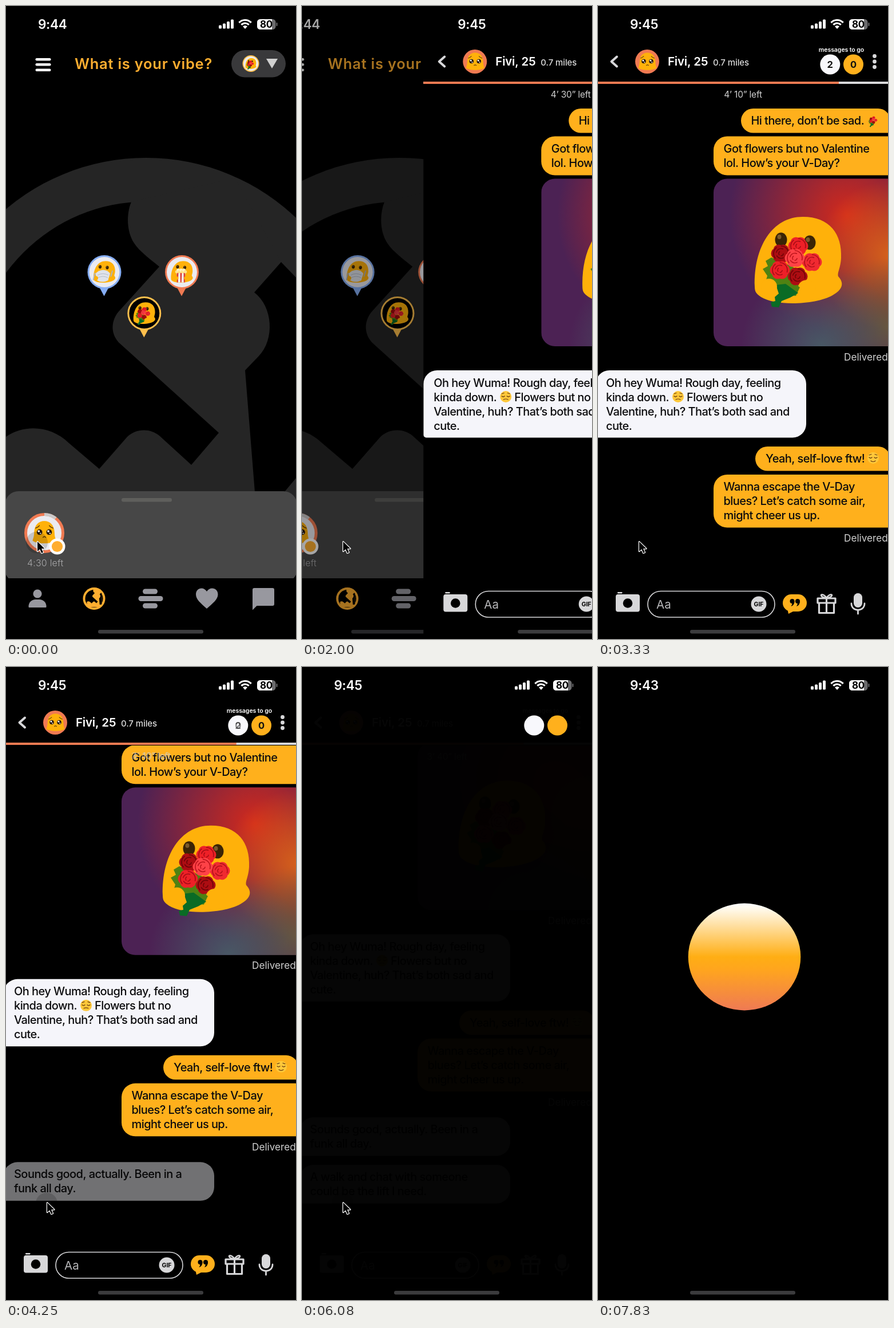
Recreate the animation shown at these times as an HTML page with a canvas. Size 507x1105 px, loop 8000 ms.

```html
<!DOCTYPE html>
<html lang="en">
<head>
<meta charset="utf-8">
<title>Vibe chat</title>
<style>
html, body { margin: 0; width: 100%; height: 100%; overflow: hidden; background: #000; }
canvas { display: block; width: 100vw; height: 100vh; }
</style>
</head>
<body>
<canvas id="stage"></canvas>
<script>
const W = 507, H = 1105, LOOP = 8000, PAGE = 515;
const AMBER = '#ffb01c', CORAL = '#f07a52', LAND = '#252525', ICON = '#98989f', PALE = '#d8d8da';
const BLOB = '#ffb10a';
const canvas = document.getElementById('stage');
const ctx = canvas.getContext('2d');

// ---- helpers ----
const clamp = v => Math.max(0, Math.min(1, v));
const span = (t, a, b) => clamp((t - a) / (b - a));
const smooth = (t, a, b) => { const u = span(t, a, b); return u * u * (3 - 2 * u); };
const easeOut = (t, a, b) => 1 - (1 - span(t, a, b)) ** 3;
const mix = (a, b, k) => a + (b - a) * k;

function group(draw, x = 0, y = 0, s = 1, alpha = 1) {
  if (alpha <= 0) return;
  ctx.save();
  ctx.globalAlpha *= alpha;
  ctx.translate(x, y);
  ctx.scale(s, s);
  draw();
  ctx.restore();
}
function fade(alpha, draw) { group(draw, 0, 0, 1, alpha); }
function text(str, x, y, size, color, weight = 400, spacing = 0, align = 'left') {
  ctx.font = `${weight} ${size}px Inter, sans-serif`;
  ctx.letterSpacing = spacing + 'px';
  ctx.textAlign = align;
  ctx.fillStyle = color;
  ctx.fillText(str, x, y);
}
function box(x, y, w, h, r, color) {
  ctx.beginPath();
  ctx.roundRect(x, y, w, h, r);
  ctx.fillStyle = color;
  ctx.fill();
}
function oval(x, y, rx, ry, color) {
  ctx.beginPath();
  ctx.ellipse(x, y, rx, ry, 0, 0, 7);
  ctx.fillStyle = color;
  ctx.fill();
}
const disc = (x, y, r, color) => oval(x, y, r, r, color);
function fill(d, color) { ctx.fillStyle = color; ctx.fill(new Path2D(d)); }
function stroke(d, color, width) {
  ctx.strokeStyle = color;
  ctx.lineWidth = width;
  ctx.lineCap = ctx.lineJoin = 'round';
  ctx.stroke(new Path2D(d));
}
function ring(x, y, r, color, width, a = 0, b = Math.PI * 2) {
  ctx.beginPath();
  ctx.arc(x, y, r, a, b);
  ctx.strokeStyle = color;
  ctx.lineWidth = width;
  ctx.lineCap = 'butt';
  ctx.stroke();
}

// ---- characters ----
const BODY = 'M-76 45C-78-25-45-77 8-77C55-77 77-47 75-5C74 13 68 20 70 27C82 40 76 51 60 60C30 77-40 79-65 63C-74 57-76 53-76 45Z';
const BELL = 'M-76 54C-74 40-66 30-66 0C-64-50-35-74 0-74C35-74 64-50 66 0C66 30 74 40 76 54C50 76-50 76-76 54Z';

function rose(x, y, color, line) {
  for (let i = 0; i < 6; i++) {
    const a = i * Math.PI / 3;
    disc(x + 8 * Math.cos(a), y + 7 * Math.sin(a), 9.5, color);
  }
  for (const [r, a] of [[4, 0], [8.5, 1], [13, 2.4]]) {
    ring(x, y, r, line, 1.7, a, a + 1.7);
    ring(x, y, r, line, 1.7, a + 2.3, a + 4.2);
  }
}
function bouquet() {
  fill('M-47-6L-57 0L-53 9L-62 14L-54 26L-57 36L-38 42L-30 59L-4 61L2 48L14 28L-10 10Z', '#4f8212');
  fill('M-39 42L-34 57L-41 63L-40 70L-48 72L-46 80L-34 81L-29 70L-14 64L0 56L-22 40Z', '#0a6b25');
  rose(-30, -13, '#ad0d12', '#6d0508');
  rose(0, -26, '#ee2027', '#a80d16');
  rose(24, 2, '#f02a31', '#b3121a');
  rose(-32, 16, '#ee2027', '#a80d16');
  rose(-1, 27, '#ad0d12', '#6d0508');
  rose(-6, -5, '#ff4247', '#bd151d');
}
const extras = {
  flowers() {
    bouquet();
    disc(-51, 45, 14, BLOB);
    fill('M0 44C4 30 24 30 30 42C34 56 20 64 10 62C8 54 6 48 0 44Z', BLOB);
  },
  popcorn() {
    fill('M-38 5L26 5L16 72L-28 72Z', '#f4f4f4');
    for (let i = 0; i < 3; i++) fill(`M${-36 + i * 24} 5h12l-3 67h-8Z`, '#dc3d32');
    for (let i = 0; i < 7; i++) disc(-36 + i * 10, -2 - (i % 2) * 12, 11, i % 2 ? '#fff3c4' : '#ffe28a');
    disc(-36, 42, 12, BLOB);
    disc(27, 42, 12, BLOB);
  },
  cloth() {
    fill('M-62 10C-30-22 14-24 40 10L26 58C0 72-36 72-52 56Z', '#dfe3ea');
    stroke('M-46 20Q-10 2 26 20M-42 38Q-10 22 22 38', '#b3bac8', 4);
    stroke('M-66 8L-78 54M56-8L42 40', '#a8b4cc', 7);
    disc(-58, 42, 14, BLOB);
    disc(44, 46, 14, BLOB);
  },
  sad() {
    for (const x of [-31, 31]) {
      disc(x, -2, 18, '#26160a');
      disc(x - 5, -8, 7, '#fff');
      disc(x + 6, 6, 4.5, '#fff');
    }
    stroke('M-56-28Q-42-32-32-44M56-28Q42-32 32-44M-9 32Q0 22 9 32', '#4a2b08', 5);
  }
};
function blob(x, y, s, kind) {
  group(() => {
    fill(kind === 'sad' ? BELL : BODY, BLOB);
    if (kind !== 'sad') {
      for (const [ex, ey] of [[-30, -37], [20, -32]]) {
        oval(ex, ey, 10.5, 12.5, '#3a2405');
        oval(ex - 3, ey - 5, 3.5, 4, '#7a5a2c');
      }
    }
    extras[kind]();
  }, x, y, s);
}
function smiley(x, y, calm) {
  disc(x, y, 10, '#ffc83a');
  stroke(`M${x - 7} ${y - 1}q2.5 2.5 5 0M${x + 2} ${y - 1}q2.5 2.5 5 0`, '#6b3d10', 1.3);
  stroke(`M${x - 4} ${y + 5}q4 ${calm ? 3 : -2} 8 0M${x - 7} ${y - 5}l4 -1.5M${x + 7} ${y - 5}l-4 -1.5`, '#6b3d10', 1.2);
}

// ---- shared chrome ----
function statusBar(clock) {
  text(clock, 56, 40, 22.5, '#fff', 600, -0.3);
  [6, 9, 12.5, 16].forEach((h, i) => box(372 + i * 7, 39.5 - h, 5, h, 1.5, '#fff'));
  for (const r of [14.5, 9]) ring(418, 39, r, '#fff', 3.2, -Math.PI * 0.76, -Math.PI * 0.24);
  fill('M418 40L414 35.5Q418 32.5 422 35.5Z', '#fff');
  box(439, 23, 32.5, 18, 5.5, '#6c6c6e');
  box(439, 23, 26, 18, [5.5, 0, 0, 5.5], '#fff');
  box(472.5, 29, 2, 6, 1, '#6c6c6e');
  text('80', 455, 38.2, 17, '#000', 700, -0.3, 'center');
}
const homeBar = () => box(161, 1089, 184, 6.5, 3.2, '#3b3b3d');

function cursor(x, y) {
  group(() => {
    const arrow = 'M0 0V17L4.2 13.2L7.2 20L10 18.8L7 12.2H12.4Z';
    stroke(arrow, '#fff', 2.4);
    fill(arrow, '#000');
  }, x + 1, y + 1);
}

// ---- map page ----
function pin(x, y, color, back, kind) {
  fill(`M${x - 9} ${y + 26}h17l-8.5 16Z`, color);
  disc(x, y, 29.5, color);
  disc(x, y, 26.5, back);
  blob(x, y, 0.25, kind);
}
function globe(land) {
  disc(245, 645, 380, land);
  disc(245, 645, 303.5, '#000');
  fill('M219 342C210 364 211 394 224 414C234 429 250 440 268 455L200 530C182 548 182 574 200 590L372 745L324 801L268 750C252 737 228 737 212 752L163 808L110 763C78 732 32 730 0 752V930H435L507 860V474L481 447L400 300Z', land);
  fill('M481 447L434 500C467 525 470 582 442 611L418 636L435 848H487L507 824V474Z', '#000');
}
function tabBar() {
  ctx.fillStyle = '#000';
  ctx.fillRect(0, 999, W, 106);
  disc(55, 1026, 7.6, ICON);
  box(39.5, 1036, 31, 14, [12, 12, 1, 1], ICON);
  const s = 19.5 / 380;
  group(() => globe('#ffae30'), 154 - 245 * s, 1034.5 - 645 * s, s);
  box(239, 1017.5, 26, 9, 4.5, ICON);
  box(231.5, 1030, 43, 9, 4.5, ICON);
  box(239, 1042.5, 26, 9, 4.5, ICON);
  fill('M351 1052C340 1042 332 1036 332 1027C332 1015 346 1013 351 1022C356 1013 370.5 1015 370.5 1027C370.5 1036 362 1042 351 1052Z', ICON);
  box(431, 1016, 38, 31, 3, ICON);
  fill('M431 1040V1054.5L439 1046.5Z', ICON);
  homeBar();
}
function mapPage() {
  globe(LAND);
  statusBar('9:44');
  for (const y of [91, 100, 109.5]) box(51.5, y, 27, 4.4, 2.2, '#fff');
  text('What is your vibe?', 120, 110, 25.5, '#ffae30', 600, 0.75);
  box(394, 77, 95, 47.5, 23.7, '#39393b');
  disc(428, 100.5, 14.5, '#ffc04d');
  disc(428, 100.5, 12.8, '#ececf0');
  blob(428, 100.5, 0.125, 'flowers');
  fill('M455 92H475L465 109Z', '#d0d0d0');
  pin(172, 464.5, '#86aef5', '#ebebf0', 'cloth');
  pin(307.5, 464.5, CORAL, '#ebebf0', 'popcorn');
  pin(241.8, 536.5, '#ffc04d', '#000', 'flowers');

  box(-2, 847, 511, 160, 24, '#474747');
  box(202, 859, 88, 6.5, 3.2, '#5f5f5c');
  disc(67, 920, 32, '#ebebf0');
  ring(67, 920, 32.5, CORAL, 5);
  ring(67, 920, 32.5, '#c9c9c9', 5, -Math.PI / 2, -Math.PI * 0.29);
  blob(67, 919, 0.27, 'sad');
  disc(89.5, 943.5, 14, '#fff');
  disc(89.5, 943.5, 9.6, '#ffae30');
  text('4:30 left', 37, 977.5, 16, '#a9a9ab', 300, 0.2);
  tabBar();
}

// ---- chat page ----
const say = (str, x, y) => text(str, x, y, 20, '#0c0c0e', 500, -0.55);
function lines(x, y, list) { list.forEach((s, i) => say(s, x, y + i * 25)); }
const mine = (x, y, h, r) => box(x, y, 511 - x, h, r, AMBER);
const theirs = (y, h, r) => box(-4, y, 368, h, r, '#f5f5fa');
const delivered = y => text('Delivered', 430, y, 17.2, '#d0d0d0');

function glow(x, y, r, rgb, alpha) {
  const g = ctx.createRadialGradient(x, y, 0, x, y, r);
  g.addColorStop(0, `rgba(${rgb},${alpha})`);
  g.addColorStop(0.5, `rgba(${rgb},${alpha * 0.5})`);
  g.addColorStop(1, `rgba(${rgb},0)`);
  ctx.fillStyle = g;
  ctx.fillRect(202, 301, 310, 294);
}
function photo() {
  ctx.save();
  ctx.beginPath();
  ctx.roundRect(202, 301.5, 309, 292.5, [24, 5, 5, 24]);
  ctx.clip();
  ctx.fillStyle = '#4c2254';
  ctx.fillRect(202, 301, 310, 294);
  glow(435, 365, 205, '218,42,25', 0.95);
  glow(511, 435, 130, '230,112,20', 0.8);
  glow(505, 560, 120, '112,96,52', 0.8);
  glow(390, 595, 140, '72,98,104', 0.85);
  ctx.restore();
  blob(350, 445, 1, 'flowers');
}
function thread(sent, reply) {
  mine(250, 179, 42.5, [22, 22, 5, 22]);
  say('Hi there, don’t be sad.', 267.5, 207);
  group(bouquet, 482, 199, 0.15);
  mine(202, 227.5, 68, [24, 5, 5, 24]);
  lines(219.5, 256, ['Got flowers but no Valentine', 'lol. How’s your V-Day?']);
  photo();
  delivered(618.5);
  theirs(636, 117.5, [24, 24, 24, 5]);
  lines(14, 664.5, ['Oh hey Wuma! Rough day, feeling', 'kinda down.', 'Valentine, huh? That’s both sad and', 'cute.']);
  smiley(140, 682, false);
  say('Flowers but no', 155, 689.5);
  fade(sent, () => {
    mine(275, 769, 42.5, [22, 22, 5, 22]);
    say('Yeah, self-love ftw!', 293, 797);
    smiley(481, 789, true);
    mine(202, 818, 92.5, [24, 5, 5, 24]);
    lines(219.5, 846, ['Wanna escape the V-Day', 'blues? Let’s catch some air,', 'might cheer us up.']);
    delivered(935);
  });
  // a black veil keeps the half-faded text readable
  if (reply > 0) {
    theirs(955.5, 67.5, [24, 24, 24, 5]);
    theirs(1038.5, 67.5, [24, 24, 24, 5]);
    lines(14, 983.5, ['Sounds good, actually. Been in a', 'funk all day.']);
    lines(14, 1066.5, ['A walk and chat with someone', 'could be the lift I need.']);
    ctx.fillStyle = `rgba(0,0,0,${1 - reply})`;
    ctx.fillRect(-4, 955, 369, 152);
  }
}
function composer() {
  box(31, 1027, 42, 30.5, 4, PALE);
  box(34, 1023, 8.5, 2.6, 1, PALE);
  disc(52, 1042.5, 8.3, '#000');
  ctx.beginPath();
  ctx.roundRect(87, 1021.5, 222, 45.5, 22.7);
  ctx.strokeStyle = PALE;
  ctx.lineWidth = 1.6;
  ctx.stroke();
  text('Aa', 102, 1051.5, 20.5, '#b8b8ba');
  disc(281, 1044, 13.5, PALE);
  text('GIF', 281, 1047.8, 10.5, '#000', 700, 0, 'center');

  box(323, 1027, 42, 30, 15, AMBER);
  fill('M331 1052L333 1061L345 1055Z', AMBER);
  for (const x of [339.5, 349]) {
    disc(x, 1039, 4, '#000');
    fill(`M${x + 4} 1039Q${x + 4} 1046 ${x - 2} 1048Q${x} 1045 ${x} 1042Z`, '#000');
  }
  stroke('M384 1034H415V1042H384ZM386.5 1042V1059.5H412.5V1042M399.5 1034V1059', PALE, 3.2);
  stroke('M399.5 1033C390 1033 388 1027 392 1027.5C396 1028 398 1031 399.5 1033C401 1031 403 1028 407 1027.5C411 1027 409 1033 399.5 1033Z', PALE, 2.6);
  box(447, 1025, 15, 25, 7.5, PALE);
  stroke('M443 1043C443 1058 466 1058 466 1043M454.5 1055V1061', PALE, 2.8);
}
function chatHeader(sent, reply) {
  stroke('M33 88.5L23.5 97L33 105.5', PALE, 4);
  disc(86, 97, 21, CORAL);
  blob(86.5, 97, 0.21, 'sad');
  text('Fivi, 25', 122, 104, 20.5, '#fff', 600, -0.2);
  text('0.7 miles', 201, 104, 15, '#dcdcdc', 500, -0.1);
  text('messages to go', 425.5, 79.5, 10.6, '#fff', 600, -0.1, 'center');
  for (const y of [87.5, 97, 106.5]) disc(483.5, y, 3.4, PALE);
  ctx.fillStyle = PALE;
  ctx.fillRect(-4, 132, PAGE, 4);
  ctx.fillStyle = CORAL;
  ctx.fillRect(-4, 132, 4 + mix(mix(456, 421, sent), 387, reply), 4);
}
function counters(sent, reply) {
  disc(405.8, 102, 17.5, '#f8f8fc');
  disc(446.5, 102, 17.5, AMBER);
  const digit = (s, x, a) => fade(a, () => text(s, x, 107.8, 16.5, '#111', 700, 0, 'center'));
  digit('2', 405.8, 1 - reply);
  digit('0', 405.8, reply);
  digit('2', 446.5, 1 - sent);
  digit('0', 446.5, sent);
}
function chatPage(sent, scroll, reply) {
  ctx.fillStyle = '#000';
  ctx.fillRect(-4, 0, PAGE, H);
  ctx.save();
  ctx.beginPath();
  ctx.rect(-4, 137, PAGE, 808);
  ctx.clip();
  group(() => thread(sent, reply), 0, -169.5 * scroll);
  ctx.restore();
  const timer = (s, a) => fade(a, () => text(s, 253.5, 160 + 2 * scroll, 15.5, '#d0d0d0', 400, -0.2, 'center'));
  timer('4’ 30” left', 1 - sent);
  timer('4’ 10” left', sent * (1 - reply));
  timer('3’ 40” left', reply);
  chatHeader(sent, scroll);
  counters(sent, reply);
  composer();
  statusBar('9:45');
  homeBar();
}

// ---- closing circles and sun ----
function sun(rx, ry) {
  const g = ctx.createLinearGradient(0, 506 - ry, 0, 506 + ry);
  g.addColorStop(0, '#fff');
  g.addColorStop(0.06, '#fff8e8');
  g.addColorStop(0.5, '#ffae14');
  g.addColorStop(0.62, '#ffa51e');
  g.addColorStop(1, '#ef7a54');
  oval(256, 506, rx, ry, g);
}
function finale(t) {
  const go = smooth(t, 6100, 6330), meet = smooth(t, 6450, 6670), grow = smooth(t, 7030, 7670);
  const r = mix(17.5, 64, go), y = mix(102, 506, go), gap = 64 * (1 - meet);
  if (grow < 1) {
    disc(mix(405.8, 256 - gap, go), y, r, '#f8f8fc');
    disc(mix(446.5, 256 + gap, go), y, r, AMBER);
  }
  fade(smooth(t, 6670, 6920), () => sun(mix(64, 98.3, grow), mix(64, 93.4, grow)));
}

function draw(t) {
  const slide = easeOut(t, 1946, 2165);
  const sent = smooth(t, 2970, 3330);
  const scroll = smooth(t, 4064, 4420), reply = smooth(t, 4080, 4440);
  const dim = smooth(t, 5900, 6100);
  ctx.fillStyle = '#000';
  ctx.fillRect(0, 0, W, H);

  if (slide < 1) {
    group(mapPage, -129 * slide);
    ctx.fillStyle = `rgba(0,0,0,${0.6 * slide})`;
    ctx.fillRect(0, 0, W, H);
  }
  if (slide > 0 && dim < 1) group(() => chatPage(sent, scroll, reply), PAGE * (1 - slide));
  const cx = mix(54, 71, smooth(t, 1210, 1420));
  const touch = 1 - span(t, 1540, 1670) + span(t, 3900, 4060);
  if (dim < 1) disc(cx, 936.5, 19, `rgba(0,0,0,${0.17 * touch})`);
  if (dim > 0) {
    ctx.fillStyle = `rgba(0,0,0,${dim})`;
    ctx.fillRect(0, 0, W, H);
    statusBar(t < 6500 ? '9:45' : '9:43');
    homeBar();
    finale(t);
    fade(1 - span(t, 5900, 6000), () => counters(1, 1));
  }
  if (t < 7080) cursor(cx, 934);
}

function resize() {
  const d = window.devicePixelRatio || 1;
  canvas.width = Math.round(innerWidth * d);
  canvas.height = Math.round(innerHeight * d);
}
addEventListener('resize', resize);
resize();

const start = performance.now();
function tick(now) {
  ctx.setTransform(canvas.width / W, 0, 0, canvas.height / H, 0, 0);
  draw(Math.max(0, now - start) % LOOP);
  requestAnimationFrame(tick);
}
requestAnimationFrame(tick);
</script>
</body>
</html>
```
